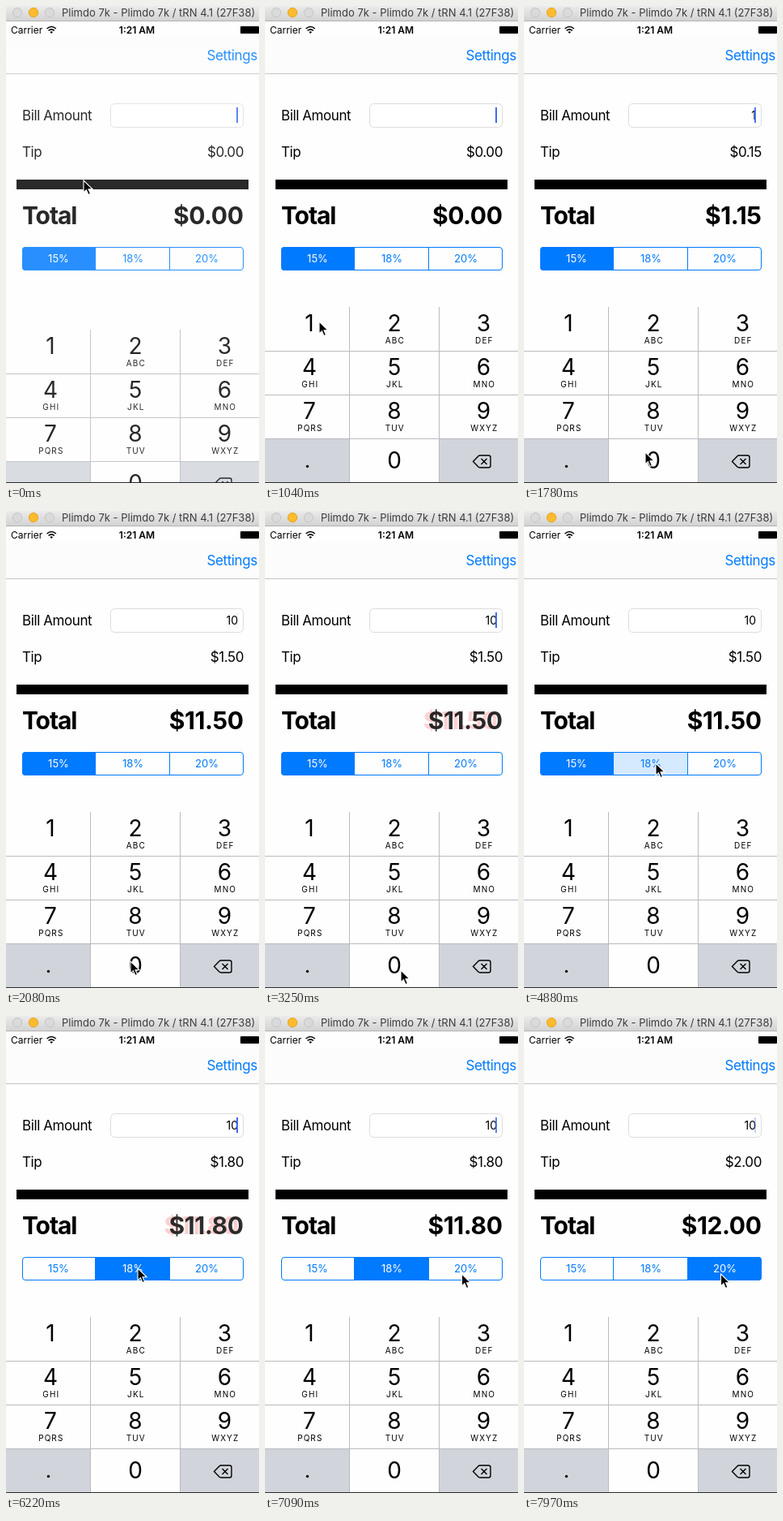
An HTML page for the animation above (8000 ms loop, 313 by 588 pixels).

```html
<!DOCTYPE html>
<html lang="en">
<head>
<meta charset="utf-8">
<title>Tip calculator</title>
<style>
  html, body { margin: 0; width: 313px; height: 588px; overflow: hidden; background: #fefefe; }
  svg { display: block; }
  text { font-family: Inter, Roboto, sans-serif; }
  .body { font-size: 17px; letter-spacing: -.41px; }
  .big { font-size: 30px; font-weight: 700; letter-spacing: -.4px; }
  .seg { font-size: 13px; text-anchor: middle; }
  .digit { font-size: 28px; text-anchor: middle; }
  .letters { font-size: 10px; letter-spacing: 1.1px; text-anchor: middle; }
  .end { text-anchor: end; }
  .blue { fill: #007aff; }
</style>
</head>
<body>
<svg width="313" height="588" viewBox="0 0 313 588">
  <defs>
    <linearGradient id="chrome" x2="0" y2="1">
      <stop stop-color="#ebebeb"/><stop offset="1" stop-color="#d3d3d3"/>
    </linearGradient>
    <clipPath id="pill"><rect x="20" y="297" width="274" height="29" rx="4"/></clipPath>
  </defs>
  <rect width="313" height="588" fill="#fefefe"/>

  <!-- navigation bar and form -->
  <rect y="39" width="313" height="44" fill="#fcfcfc"/>
  <rect y="83" width="313" height="1" fill="#c4c4c6"/>
  <text class="body blue" x="248.5" y="67">Settings</text>
  <text class="body" x="20" y="141">Bill Amount</text>
  <rect x="129.5" y="120.5" width="164" height="29" rx="5" fill="#fff" stroke="#dcdcdc"/>
  <text id="bill" class="end" x="287" y="139.5" font-size="14"></text>
  <rect id="caret" x="285" y="125" width="2" height="19" fill="#426bf2"/>
  <text class="body" x="20" y="186">Tip</text>
  <text id="tip" class="body end" x="294" y="186"></text>
  <rect x="13" y="214" width="287" height="12"/>
  <text class="big" x="20" y="269" style="letter-spacing:-1.1px">Total</text>
  <text id="flash" class="big end" x="287.5" y="269" fill="#f00"></text>
  <text id="total" class="big end" x="293.5" y="269"></text>

  <g id="segments" clip-path="url(#pill)"></g>
  <rect x="20.5" y="297.5" width="273" height="28" rx="3.5" fill="none" stroke="#007aff"/>
  <path d="M110.5 297v29M202.5 297v29" stroke="#007aff"/>

  <g id="pad"></g>
  <rect id="veil" y="54" width="313" height="533" fill="#fff"/>
  <rect y="587" width="313" height="1" fill="#2a2a2a"/>

  <!-- window title and status bar -->
  <rect width="313" height="18" fill="url(#chrome)"/>
  <rect y="18" width="313" height="1" fill="#b4b4b4"/>
  <g fill="#dadada" stroke="#c6c6c6">
    <circle cx="14" cy="8" r="5.7"/>
    <circle cx="34" cy="8" r="5.7" fill="#fdbb2d" stroke="#e5a528"/>
    <circle cx="54" cy="8" r="5.7"/>
  </g>
  <text x="69" y="13" font-size="13" fill="#3c3c3c">Plimdo 7k - Plimdo 7k / tRN 4.1 (27F38)</text>
  <text x="6" y="33.5" font-size="12">Carrier</text>
  <g fill="none" stroke="#000" stroke-width="1.6">
    <path d="M50.6 28q5.6-5 11.2 0M52.6 30.4q3.6-3.2 7.2 0"/>
    <path d="M54.3 31.9q1.9-1.4 3.8 0l-1.9 2.1z" fill="#000" stroke="none"/>
  </g>
  <text x="162" y="33.5" font-size="12" font-weight="600" text-anchor="middle">1:21 AM</text>
  <rect x="290" y="25" width="23" height="9" rx="1"/>

  <path id="mouse" d="M0 0V15l3.4-3.3 2.6 5.9 2.5-1.1-2.5-5.7H11z" stroke="#fff" stroke-width="1.1"/>
</svg>
<script>
const $ = id => document.getElementById(id);
const clamp = v => Math.min(1, Math.max(0, v));
const smooth = v => (v = clamp(v)) * v * (3 - 2 * v);
const LOOP = 8000, GREY = '#d1d5db', WHITE = '#fefefe';

// segmented control
const segX = [20, 111, 203, 294];
$('segments').innerHTML = [15, 18, 20].map((rate, i) =>
  `<rect id="seg${i}" x="${segX[i]}" y="297" width="${segX[i + 1] - segX[i]}" height="29"/>
   <text id="rate${i}" class="seg" x="${[65, 157, 248.5][i]}" y="316">${rate}%</text>`).join('');

// number pad
const colX = [0, 105, 216, 313], mid = [55, 160, 270.5];
const letters = ['', 'ABC', 'DEF', 'GHI', 'JKL', 'MNO', 'PQRS', 'TUV', 'WXYZ'];
let pad = '';
for (let i = 0; i < 12; i++) {
  const c = i % 3, y = 371 + 54 * Math.floor(i / 3);
  pad += `<rect id="key${i}" x="${colX[c]}" y="${y}" width="${colX[c + 1] - colX[c]}" height="54" fill="${i == 9 || i == 11 ? GREY : WHITE}"/>`;
  if (i < 9) pad += `<text class="digit" x="${mid[c]}" y="${y + 30}">${i + 1}</text>
    <text class="letters" x="${mid[c] + .8}" y="${y + 45}">${letters[i]}</text>`;
}
$('pad').innerHTML = pad + `
  <text class="digit" x="160" y="570">0</text>
  <circle cx="52.5" cy="567.5" r="1.7"/>
  <path d="M257.5 561.5l6.3-6.6q.9-.9 2.2-.9h10.5q2.5 0 2.5 2.5v10q0 2.500-2.500 2.500H266q-1.300 0-2.200-.9zM267.500 558l7 7m0-7l-7 7" fill="none" stroke="#000" stroke-width="1.4"/>
  <path d="M104.500 371v216M215.500 371v216M0 425.500h313M0 479.500h313M0 533.500h313" stroke="#b9bbbf"/>`;

// pointer stops: time, x, y
const stops = [
  [100, 96, 215], [600, 67, 389], [1340, 67, 389], [1700, 149, 549], [1780, 150, 550],
  [1930, 154, 555], [2450, 154, 555], [2810, 168, 566], [3250, 168, 566],
  [4140, 172, 546], [4740, 163, 311], [6400, 163, 311], [7090, 243.5, 318]
];
function pointer(t) {
  const n = stops.findIndex(s => s[0] > t);
  if (n == 0) return stops[0].slice(1);
  if (n < 0) return stops[stops.length - 1].slice(1);
  const a = stops[n - 1], b = stops[n], k = smooth((t - a[0]) / (b[0] - a[0]));
  return [a[1] + (b[1] - a[1]) * k, a[2] + (b[2] - a[2]) * k];
}

// typing restarts the blink
function caret(t) {
  const start = t < 1340 ? 240 : t < 2080 ? 1760 : 2500;
  const p = ((t - start) % 975 + 975) % 975;
  return p < 280 ? 1 - p / 280 : clamp((p - 540) / 180);
}

// half a second to red, half a second back
const pulse = p => p < 0 || p > 1000 ? 0 : smooth(1 - Math.abs(p / 500 - 1));

function draw(t) {
  const bill = t < 1340 ? '' : t < 2080 ? '1' : '10';
  const chosen = t < 5030 ? 0 : t < 7390 ? 1 : 2;
  const pressed = t >= 4800 && t < 5030 ? 1 : t >= 7240 && t < 7390 ? 2 : -1;
  const tip = bill * [.15, .18, .2][chosen];
  $('bill').textContent = bill;
  $('tip').textContent = '$' + tip.toFixed(2);
  $('total').textContent = $('flash').textContent = '$' + (+bill + tip).toFixed(2);

  const red = pulse(t - 3120) + pulse(t - 6085);
  $('flash').setAttribute('opacity', red);
  $('total').setAttribute('opacity', 1 - red);
  $('caret').setAttribute('opacity', caret(t));

  for (let i = 0; i < 3; i++) {
    $('seg' + i).setAttribute('fill', i == chosen ? '#007aff' : i == pressed ? '#d5e9ff' : WHITE);
    $('rate' + i).setAttribute('fill', i == chosen ? '#fff' : '#007aff');
  }
  $('key0').setAttribute('fill', t >= 1190 && t < 1340 ? GREY : WHITE);
  $('key10').setAttribute('fill', t >= 1930 && t < 2080 ? GREY : WHITE);

  const left = (1 - clamp((t - 100) / 500)) ** 3;
  $('pad').setAttribute('transform', `translate(0 ${28 * left})`);
  $('veil').setAttribute('opacity', .16 * left);
  $('mouse').setAttribute('transform', `translate(${pointer(t)})`);
}

let begin;
function tick(now) {
  begin ??= now;
  draw((now - begin) % LOOP);
  requestAnimationFrame(tick);
}
draw(0);
requestAnimationFrame(tick);
</script>
</body>
</html>
```
